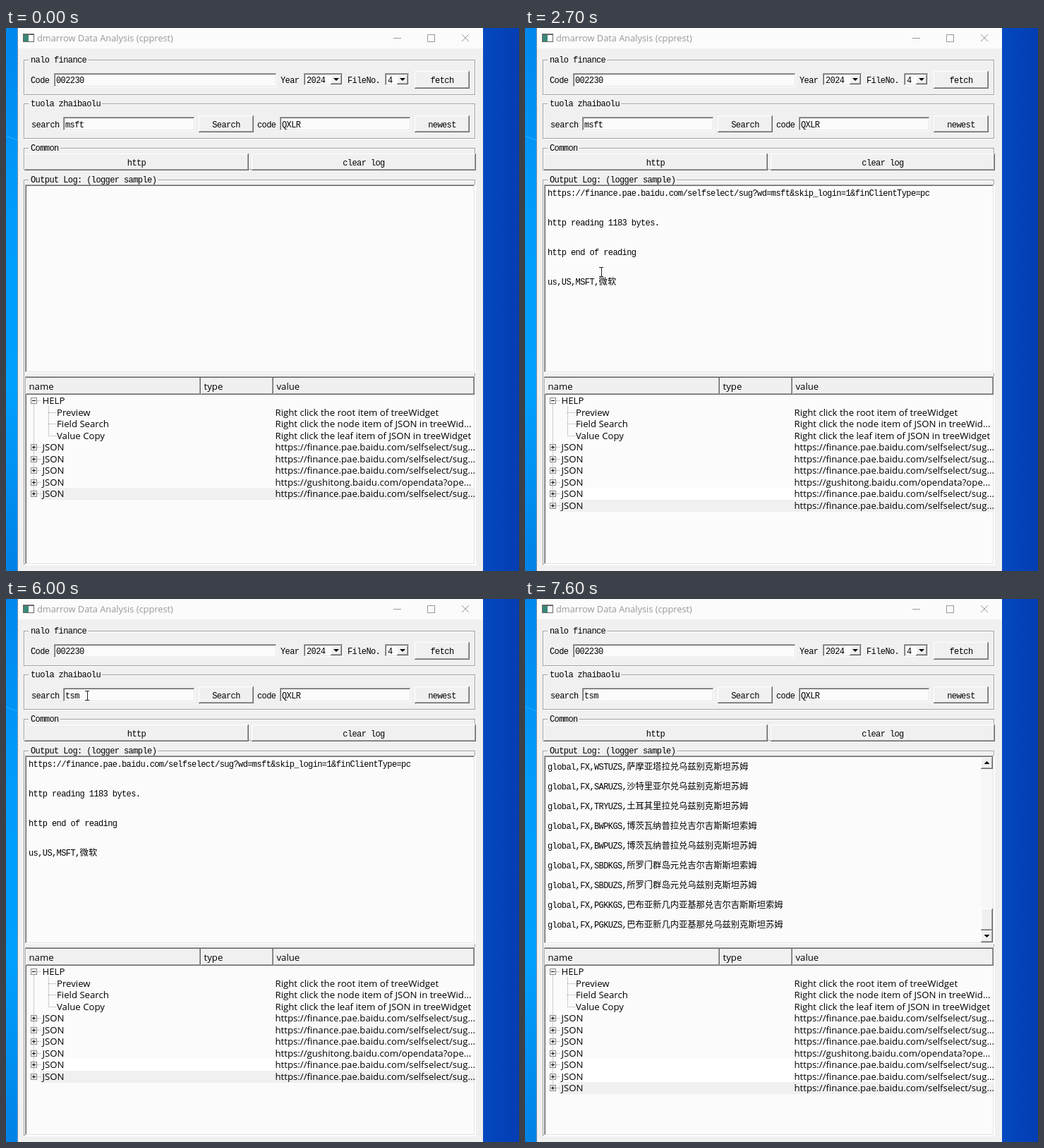
Recreate the animation shown at these times as an HTML page with a canvas. Size 727 px wide and 770 px high, loop 8 s.

```html
<!DOCTYPE html>
<html lang="en">
<meta charset="utf-8">
<title>Data Analysis</title>
<style>
  html, body { margin: 0; width: 100%; height: 100%; overflow: hidden; }
  canvas { display: block; }
</style>
<canvas id="stage" width="727" height="770"></canvas>
<script>
const g = document.getElementById('stage').getContext('2d');
const LOOP = 8000, STEP = 100;
const FACE = '#f0f0f0', PAPER = '#fbfbfb', MID = '#a0a0a0', DARK = '#696969', BLUE = '#0078d7';

const url = word => `https://finance.pae.baidu.com/selfselect/sug?wd=${word}&skip_login=1&finClientType=pc`;
const rates = [
  'WSTUZS,萨摩亚塔拉兑乌兹别克斯坦苏姆',
  'SARUZS,沙特里亚尔兑乌兹别克斯坦苏姆',
  'TRYUZS,土耳其里拉兑乌兹别克斯坦苏姆',
  'BWPKGS,博茨瓦纳普拉兑吉尔吉斯斯坦索姆',
  'BWPUZS,博茨瓦纳普拉兑乌兹别克斯坦苏姆',
  'SBDKGS,所罗门群岛元兑吉尔吉斯斯坦索姆',
  'SBDUZS,所罗门群岛元兑乌兹别克斯坦苏姆',
  'PGKKGS,巴布亚新几内亚基那兑吉尔吉斯斯坦索姆',
  'PGKUZS,巴布亚新几内亚基那兑乌兹别克斯坦苏姆'
];

// Pointer keys: time, x, y, kind (0 hidden, 1 arrow, 2 text beam)
const pointerKeys = [
  [0, 557, 83, 0], [100, 557, 83, 1], [500, 330, 139, 1], [1100, 330, 139, 1],
  [1400, 568, 108, 1], [1500, 568, 108, 0], [2700, 108, 346, 2], [2900, 72, 356, 2],
  [3200, 72, 356, 2], [3500, 134, 356, 2], [4100, 134, 356, 2], [4200, 330, 260, 1],
  [4300, 593, 148, 1], [4400, 593, 148, 1], [4500, 682, 105, 1], [4600, 682, 105, 0],
  [5300, 486, 94, 1], [5400, 400, 165, 1], [5600, 115, 137, 2], [6000, 115, 137, 2],
  [6100, 323, 144, 1], [6700, 323, 144, 1], [6900, 640, 57, 1], [7000, 640, 57, 0],
  [LOOP, 640, 57, 0]
];

const within = (t, ...spans) => spans.some(([a, b]) => t >= a && t < b);

function box(x, y, w, h, color) {
  g.fillStyle = color;
  g.fillRect(x, y, w, h);
}

function edges(x, y, w, h, topLeft, bottomRight) {
  box(x, y, w, 1, topLeft);
  box(x, y, 1, h, topLeft);
  box(x, y + h - 1, w, 1, bottomRight);
  box(x + w - 1, y, 1, h, bottomRight);
}

function stroke(points, color, dash = []) {
  g.strokeStyle = color;
  g.lineWidth = 1;
  g.setLineDash(dash);
  g.beginPath();
  points.forEach(([x, y]) => g.lineTo(x, y));
  g.stroke();
}

function fill(points, color) {
  g.fillStyle = color;
  g.beginPath();
  points.forEach(([x, y]) => g.lineTo(x, y));
  g.fill();
}

function mono(text, x, y, color = '#000') {
  g.fillStyle = color;
  for (const run of text.match(/[\x20-\x7e]+|[^\x20-\x7e]+/g) || []) {
    const latin = run < '\x7f';
    g.font = latin ? '12px "Liberation Mono", monospace' : '12.3px "Noto Sans CJK SC", "Noto Sans CJK", sans-serif';
    g.letterSpacing = latin ? '-0.6px' : '0px';
    g.fillText(run, x, y);
    x += run.length * (latin ? 6.6 : 12.3);
  }
  g.letterSpacing = '0px';
}

function sans(text, x, y, size = 13.2, color = '#000') {
  g.font = `${size}px "Open Sans", "Noto Sans", sans-serif`;
  g.fillStyle = color;
  g.fillText(text, x, y);
}

function selection(text, tx, baseline, x, y, w, h) {
  g.save();
  g.beginPath();
  g.rect(x, y, w, h);
  g.clip();
  box(x, y, w, h, BLUE);
  mono(text, tx, baseline, '#fff');
  g.restore();
}

function group(title, y, bottom) {
  edges(26, y + 1, 640, bottom - y, '#fff', '#fff');
  edges(25, y, 640, bottom - y, MID, MID);
  box(32, y - 1, title.length * 6.6 + 5, 3, FACE);
  mono(title, 35, y + 4);
}

function sunken(x, y, w, h) {
  box(x, y, w, h, PAPER);
  edges(x, y, w, h, MID, '#fff');
  edges(x + 1, y + 1, w - 2, h - 2, DARK, '#e3e3e3');
}

function raised(x, y, w, h, outer = DARK) {
  box(x, y, w, h, FACE);
  edges(x, y, w, h, '#fff', outer);
  edges(x + 1, y + 1, w - 2, h - 2, FACE, MID);
}

function button(text, x, y, w, h, state) {
  const pressed = state === 'pressed', disabled = state === 'disabled';
  raised(x, y, w, h, disabled ? '#222' : DARK);
  if (pressed) edges(x, y, w, h, DARK, '#fff');
  const tx = x + (w - text.length * 6.6) / 2 + pressed, ty = y + h / 2 + 4.5 + pressed;
  if (disabled) mono(text, tx + 1, ty + 1, '#fff');
  mono(text, tx, ty, disabled ? MID : '#000');
}

function arrowHead(x, y, dir) {
  fill([[x - 4, y - 2 * dir], [x + 4, y - 2 * dir], [x, y + 2 * dir]], '#000');
}

function combo(text, x, w) {
  sunken(x, 64, w, 18);
  mono(text, x + 4, 78);
  raised(x + w - 18, 66, 16, 14);
  arrowHead(x + w - 10, 73, 1);
}

function desktop() {
  const left = g.createLinearGradient(0, 0, 0, 770);
  ['#0087ee', '#009cfb', '#00a0ff', '#0082e4'].forEach((c, i) => left.addColorStop(i / 3, c));
  box(0, 0, 17, 770, left);
  const right = g.createLinearGradient(676, 0, 727, 0);
  right.addColorStop(0, '#0448c0');
  right.addColorStop(1, '#033db2');
  box(676, 0, 51, 770, right);
  stroke([[0, 153], [16, 159]], '#28acff');
}

function titleBar(active) {
  const ink = active ? '#000' : '#999';
  box(17, 0, 659, 29, active ? '#fff' : PAPER);
  box(24, 8, 16, 12, '#666');
  box(25, 10, 14, 9, '#fff');
  box(25, 10, 7, 9, '#398878');
  sans('dmarrow Data Analysis (cpprest)', 44, 19, 12.8, ink);
  stroke([[549, 14.5], [560, 14.5]], ink);
  g.strokeRect(597.5, 9.5, 10, 10);
  stroke([[646, 9], [656, 19]], ink);
  stroke([[656, 9], [646, 19]], ink);
}

function forms(t) {
  group('nalo finance', 45, 95);
  mono('Code', 35, 78);
  sunken(68, 64, 316, 20);
  mono('002230', 71, 78);
  mono('Year', 389, 78);
  combo('2024', 422, 56);
  mono('FileNo.', 484, 78);
  combo('4', 537, 35);
  button('fetch', 579, 61, 78, 25);

  group('tuola zhaibaolu', 107, 157);
  mono('search', 36, 141);
  sunken(81, 126, 187, 20);
  const word = t < 5800 ? 'msft' : 'tsm'.slice(0, Math.min(3, (t - 5700) / STEP));
  mono(word, 84, 141);
  if (within(t, [5700, 5800])) selection(word, 84, 141, 84, 130, 27, 13);
  const busy = within(t, [1000, 2500], [6500, 7600]);
  const pressed = within(t, [800, 1000], [6300, 6500]);
  button('Search', 273, 124, 78, 24, pressed ? 'pressed' : busy ? 'disabled' : '');
  mono('code', 356, 141);
  sunken(388, 126, 186, 20);
  mono('QXLR', 391, 141);
  if (busy) {
    selection('QXLR', 391, 141, 390, 130, 29, 13);
    if (within(t, [1000, 1900])) box(418, 130, 1, 13, '#000');
  }
  button('newest', 579, 124, 78, 24);

  group('Common', 170, 201);
  button('http', 26, 178, 318, 24);
  button('clear log', 348, 178, 318, 24);
}

function scrollBar() {
  box(646, 224, 17, 263, '#f7f7f7');
  raised(646, 224, 17, 17);
  arrowHead(654.5, 232, -1);
  raised(646, 439, 17, 31);
  raised(646, 470, 17, 17);
  arrowHead(654.5, 478, 1);
}

function log(t) {
  group('Output Log: (logger sample)', 215, 761);
  sunken(27, 222, 638, 267);
  if (t >= 7600) {
    rates.forEach((r, i) => mono('global,FX,' + r, 32, 242 + i * 28));
    scrollBar();
    return;
  }
  const answer = 'us,US,MSFT,微软';
  [
    [1000, url('msft'), 238], [2300, 'http reading 1183 bytes.', 280],
    [2400, 'http end of reading', 322], [2500, answer, 364], [6500, url('tsm'), 392]
  ].forEach(([start, text, y]) => t >= start && mono(text, 32, y));
  if (within(t, [3300, 3900])) {
    const end = Math.min(130, pointerAt(t).x);
    selection(answer, 32, 364, 72, 353, end - 72, 14);
  }
}

function node(y, open) {
  stroke([[44, y + .5], [49, y + .5]], MID, [1, 1]);
  box(35, y - 4, 9, 9, '#888');
  box(36, y - 3, 7, 7, PAPER);
  box(37, y, 5, 1, '#000');
  if (!open) box(39, y - 2, 1, 5, '#000');
}

function tree(t) {
  sunken(27, 494, 638, 267);
  [['name', 28, 248], ['type', 276, 103], ['value', 379, 285]].forEach(([text, x, w]) => {
    raised(x, 495, w, 25);
    box(x, 495, w, 1, DARK);
    sans(text, x + 4.5, 513);
  });
  const count = 5 + (t >= 2500) + (t >= 7600);
  const rowY = i => Math.round(528 + i * 16.5);
  stroke([[39.5, 533], [39.5, rowY(3 + count)]], MID, [1, 1]);
  stroke([[60.5, 536], [60.5, 578]], MID, [1, 1]);
  node(528, true);
  sans('HELP', 51.5, 533);
  [
    ['Preview', 'Right click the root item of treeWidget'],
    ['Field Search', 'Right click the node item of JSON in treeWid...'],
    ['Value Copy', 'Right click the leaf item of JSON in treeWidget']
  ].forEach(([name, value], i) => {
    const y = rowY(i + 1);
    stroke([[60, y + .5], [71, y + .5]], MID, [1, 1]);
    sans(name, 72, y + 5);
    sans(value, 381.5, y + 5);
  });
  for (let i = 0; i < count; i++) {
    const y = rowY(i + 4), last = i === count - 1;
    if (last || i > 3) box(48, y - 8, 615, 17, last ? FACE : '#fff');
    node(y);
    sans('JSON', 51.5, y + 5);
    sans(i === 3 ? 'https://gushitong.baidu.com/opendata?ope...' : 'https://finance.pae.baidu.com/selfselect/sug...', 381.5, y + 5);
  }
}

function pointerAt(t) {
  const i = pointerKeys.findLastIndex(k => k[0] <= t);
  const a = pointerKeys[i], b = pointerKeys[i + 1] || a;
  const p = (t - a[0]) / (b[0] - a[0] || 1);
  return { x: a[1] + (b[1] - a[1]) * p, y: a[2] + (b[2] - a[2]) * p, kind: a[3] };
}

function pointer(t) {
  const { x, y, kind } = pointerAt(t);
  g.save();
  g.translate(Math.round(x), Math.round(y));
  if (kind === 1) {
    const shape = [[.5, .5], [.5, 13], [3.3, 10.3], [5.5, 15.5], [7.5, 14.5], [5.3, 9.6], [9.2, 9.3], [.5, .5]];
    fill(shape, '#fff');
    stroke(shape, '#222');
  } else if (kind === 2) {
    box(-3, -7, 6, 1, '#222');
    box(0, -7, 1, 14, '#222');
    box(-3, 6, 6, 1, '#222');
  }
  g.restore();
}

function draw(now) {
  const t = Math.floor(now % LOOP / STEP) * STEP;
  desktop();
  box(16, 0, 1, 770, '#6b8fb0');
  box(17, 0, 659, 770, FACE);
  titleBar(within(t, [800, 2100], [3100, 5100], [6300, 7400]));
  forms(t);
  log(t);
  tree(t);
  pointer(t);
  requestAnimationFrame(draw);
}
requestAnimationFrame(draw);
</script>
</html>
```
